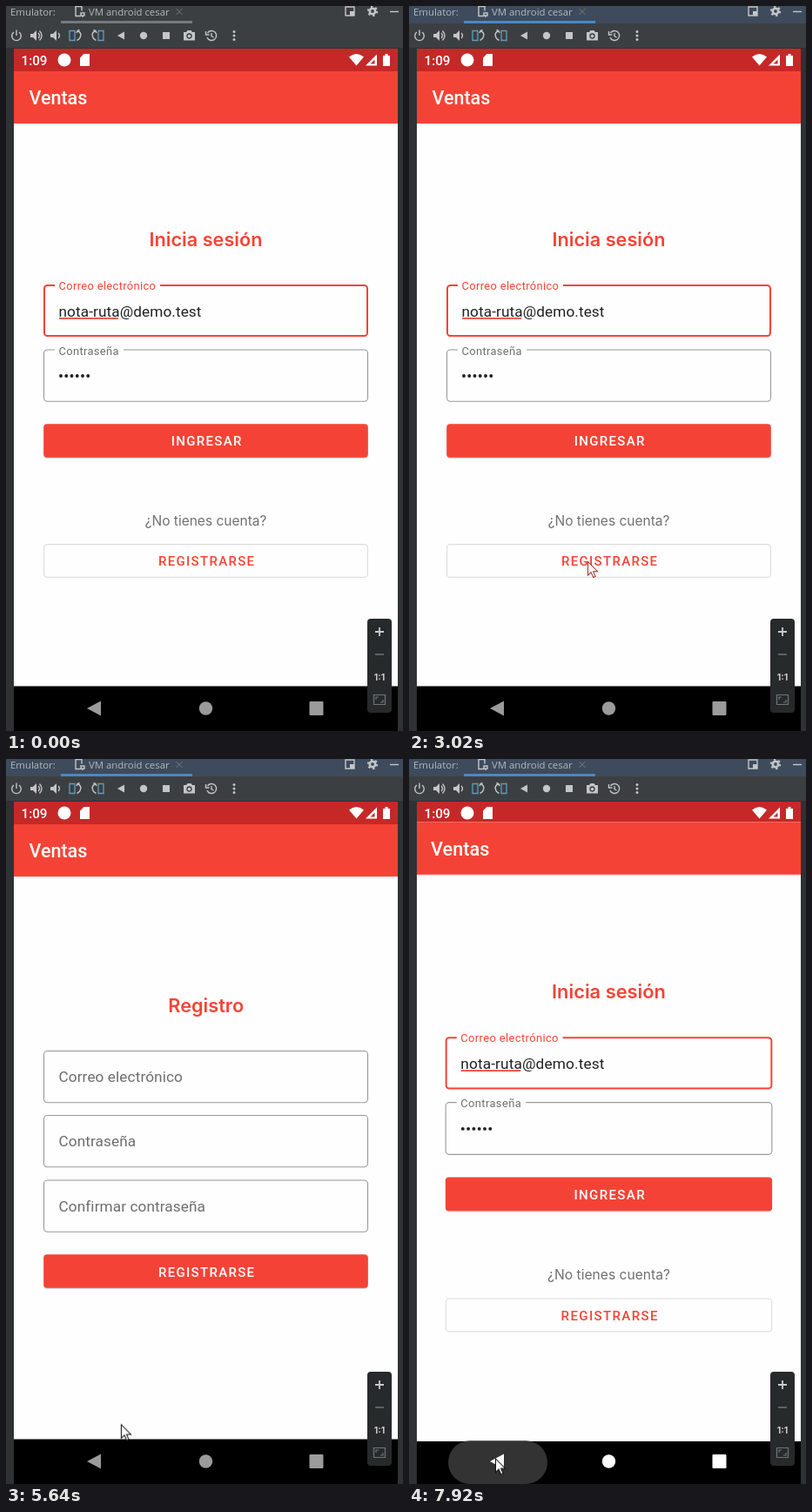
Write an HTML page that moves like this. It is 456 px wide and 833 px high and loops after 8000 ms.

```html
<!DOCTYPE html>
<html lang="es">
<head>
<meta charset="utf-8">
<title>Ventas</title>
<style>
  html, body { margin: 0; width: 100%; height: 100%; overflow: hidden; background: #2f3133; }
  svg { display: block; width: 100vw; height: 100vh; }
  text { font-family: Roboto, sans-serif; white-space: pre; }
  .ide { font: 11.4px "Open Sans", sans-serif; fill: #b4b8bb; }
  .bar { font-size: 21.5px; font-weight: 500; fill: #fff; }
  .head { font: 600 21.7px Inter, sans-serif; fill: #f44336; text-anchor: middle; }
  .ask { font: 15.5px Inter, sans-serif; fill: #707070; text-anchor: middle; }
  .in { font-size: 17.2px; letter-spacing: .1px; fill: #212121; }
  .hint { fill: #6c6c6c; }
  .label { font-size: 12.9px; letter-spacing: .35px; fill: #6f6f6f; }
  .btn { font-size: 15px; font-weight: 500; letter-spacing: 1.34px; text-anchor: middle; fill: #fff; }
  .red { fill: #f44336; }
  .box { fill: none; stroke: #989898; stroke-width: 1.1; }
  .focus { fill: none; stroke: #f44336; stroke-width: 2; }
  .ico { fill: #c3c6c8; }
  .line { fill: none; stroke: #c3c6c8; stroke-width: 1.4; }
  .blue { fill: none; stroke: #5f9cc0; stroke-width: 1.3; }

  /* every animation shares one 8 s loop: 1% = 80 ms */
  .loop { animation: 8s linear infinite; }
  .step { animation-timing-function: step-end; }
  #login, #signup { transform-origin: 229.5px 441px; }
  #title { animation-name: title; }
  #tab { animation-name: tab; }
  #caret { animation-name: caret; }
  #press { animation-name: press; }
  #login { animation-name: login; }
  #signup { animation-name: signup, fade; }
  #halo { animation-name: halo; }
  #nav { animation-name: nav; }
  #mouse-x { animation-name: mouse-x; }
  #mouse-y { animation-name: mouse-y; }
  #mouse { animation-name: mouse; }

  @keyframes title { 0% { fill: #3c3f41; } 26.875%, 100% { fill: #3d4b5c; } }
  @keyframes tab { 0% { fill: #747a80; } 26.875%, 100% { fill: #4a88c7; } }
  @keyframes caret {
    0%, 7.75%, 20.25%, 37%, 100% { opacity: 0; }
    1.5%, 14%, 26% { opacity: 1; }
  }
  @keyframes press {
    0%, 26.87% { cx: 205px; r: 14px; opacity: 0; }
    26.875% { cx: 205px; r: 14px; opacity: .12; animation-timing-function: ease-out; }
    34.5% { cx: 229px; r: 190px; opacity: .12; }
    37%, 100% { cx: 229px; r: 200px; opacity: 0; }
  }
  @keyframes login {
    0% { transform: scale(1); }
    47.5% { transform: scale(1); animation-timing-function: cubic-bezier(.22, 1, .36, 1); }
    53.125%, 97.2% { transform: scale(1.05); }
    97.21% { transform: scale(1.02); animation-timing-function: ease-out; }
    100% { transform: scale(1.0045); }
  }
  @keyframes signup {
    0% { transform: scale(.85); }
    47.5% { transform: scale(.85); animation-timing-function: cubic-bezier(.22, 1, .36, 1); }
    53.125%, 96.6% { transform: scale(1); }
    98.1%, 100% { transform: scale(.92); }
  }
  @keyframes fade {
    0%, 47.69% { opacity: 0; }
    49.125%, 96.6% { opacity: 1; }
    98.1%, 100% { opacity: 0; }
  }
  @keyframes halo {
    0%, 82.99% { x: 87px; y: 791px; width: 24px; height: 24px; rx: 12px; fill: #121212; opacity: 0; }
    83% { x: 87px; y: 791px; width: 24px; height: 24px; rx: 12px; fill: #121212; opacity: 1; }
    85.5% { x: 50px; y: 782px; width: 104px; height: 51px; rx: 25.5px; fill: #1c1c1c; }
    89%, 97.2% { x: 45px; y: 782px; width: 114px; height: 51px; rx: 25.5px; fill: #333; }
    100% { x: 45px; y: 784px; width: 114px; height: 49px; rx: 24.5px; fill: #333; opacity: 1; }
  }
  @keyframes nav { 0%, 85.5% { fill: #9b9b9b; } 89%, 100% { fill: #fff; } }
  @keyframes mouse-x {
    0%, 6.375% { transform: translateX(431px); }
    14.25% { transform: translateX(28px); }
    15.75% { transform: translateX(59px); }
    21% { transform: translateX(182px); animation-timing-function: ease-out; }
    26.125%, 60.25% { transform: translateX(205px); }
    70.5% { transform: translateX(132px); animation-timing-function: ease-out; }
    75.75% { transform: translateX(94px); }
    78%, 100% { transform: translateX(99px); }
  }
  @keyframes mouse-y {
    0%, 6.375% { transform: translateY(815px); }
    15.75% { transform: translateY(645px); }
    21% { transform: translateY(627px); animation-timing-function: ease-in-out; }
    26.125% { transform: translateY(638px); }
    60.25% { transform: translateY(638px); animation-timing-function: ease-out; }
    64.75% { transform: translateY(346px); animation-timing-function: ease-in; }
    70.5% { transform: translateY(764px); animation-timing-function: ease-out; }
    73.5% { transform: translateY(814px); }
    78%, 100% { transform: translateY(803.500px); }
  }
  @keyframes mouse {
    0% { stroke: #111; opacity: 0; }
    6.375% { stroke: #111; opacity: 1; }
    26.2% { stroke: #a8332c; opacity: 1; }
    61%, 100% { stroke: #111; opacity: 1; }
  }
</style>
</head>
<body>
<svg viewBox="0 0 456 833" preserveAspectRatio="none">
  <defs>
    <clipPath id="device"><rect x="9" y="49" width="441" height="784"/></clipPath>
    <clipPath id="outline"><rect x="43" y="618" width="373" height="39" rx="4"/></clipPath>
    <linearGradient id="fall" x2="0" y2="1">
      <stop stop-color="#000" stop-opacity=".1"/><stop offset="1" stop-color="#000" stop-opacity="0"/>
    </linearGradient>
    <g id="page">
      <rect x="9" y="49" width="441" height="784" fill="#fefefe"/>
      <rect x="9" y="135" width="441" height="3" fill="url(#fall)"/>
      <rect x="9" y="49" width="441" height="26" fill="#c62828"/>
      <rect x="9" y="75" width="441" height="60" fill="#f44336"/>
      <rect x="9" y="781.500" width="441" height="52"/>
      <text class="bar" x="26.500" y="113">Ventas</text>
    </g>
    <g id="solid">
      <rect x="43.300" y="2" width="372.400" height="38" rx="4" fill="#000" opacity=".16"/>
      <rect x="43.200" y=".3" width="372.600" height="38.500" rx="4" fill="#f44336"/>
    </g>
    <rect id="field" x="43.500" y=".5" width="372" height="59.300" rx="4"/>
  </defs>

  <!-- emulator window -->
  <rect width="456" height="833" fill="#2f3133"/>
  <rect y="20" width="456" height="28" fill="#3c3f41"/>
  <rect id="title" class="loop step" width="456" height="20"/>
  <rect id="tab" class="loop step" x="63" y="17" width="151" height="3"/>
  <text class="ide" x="5" y="11">Emulator:</text>
  <text class="ide" x="95" y="11">VM android cesar</text>
  <path class="line" d="M86 11.500h-6v-11h7v5M86 8h4v3h-4zM88 11v2"/>
  <path class="line" d="M195.500 3l7 7m0-7l-7 7" style="stroke:#74787b;stroke-width:1"/>
  <path class="line" d="M390 1h10v10h-10z"/><path class="ico" d="M395 6h5v5h-5z"/>
  <circle class="line" cx="421" cy="6" r="3.200" style="stroke-width:2.600"/>
  <circle class="line" cx="421" cy="6" r="5.200" style="stroke-width:2;stroke-dasharray:2.300 3.145"/>
  <path class="line" d="M441 6.500h10"/>
  <path class="line" d="M9 30a5.300 5.300 0 1 0 6 0M12 27.500v6.500"/>
  <path class="ico" d="M28 32h3l4-4v12l-4-4h-3z"/>
  <path class="line" d="M37 31q3 3 0 6M38.500 28.500q5 5.500 0 11"/>
  <path class="ico" d="M51 32h3l4-4v12l-4-4h-3z"/><path class="line" d="M60 31q3 3 0 6"/>
  <path class="blue" d="M73 28.500h6v11h-6z"/>
  <path class="line" d="M82 28.500q5 2 3.500 6.500q-.5 3-4 4.500M81 31l1-2.500l2.500-1"/>
  <path class="blue" d="M106 28.500h6v11h-6z"/>
  <path class="line" d="M103 28.500q-5 2-3.500 6.500q.5 3 4 4.500M104 31l-1-2.500l-2.500-1"/>
  <path class="ico" d="M128 34l8-4.500v9z"/>
  <circle class="ico" cx="158" cy="34" r="4.200"/>
  <path class="ico" d="M180 30h8v8h-8z"/>
  <path class="ico" d="M204 30h3l1.500-2h4l1.500 2h3v9.500h-13z"/>
  <circle cx="210.500" cy="34.500" r="2.500" fill="none" stroke="#3c3f41" stroke-width="1.300"/>
  <path class="line" d="M231 36a5.500 5.500 0 1 0 .5-5M229.500 29v4h4M236 31v3.500l2.500 1.500"/>
  <path d="M262 29.500v9.500" stroke="#c3c6c8" stroke-width="3" stroke-linecap="round" stroke-dasharray="0 4.500"/>

  <g clip-path="url(#device)">
    <g id="login" class="loop">
      <use href="#page"/>
      <text class="head" x="229.500" y="276">Inicia sesión</text>
      <rect class="focus" x="44" y="321" width="371" height="58" rx="3.500"/>
      <rect x="56" y="317" width="121" height="8" fill="#fefefe"/>
      <text class="label red" x="60.500" y="326">Correo electrónico</text>
      <text class="in" x="60.500" y="357">nota-ruta@demo.test</text>
      <path d="M61 358.800h68" stroke="#f44336" stroke-width="1.700"/>
      <rect id="caret" class="loop step" x="226" y="338" width="2" height="24" fill="#f44336"/>
      <use href="#field" class="box" y="394.500"/>
      <rect x="56" y="392" width="79" height="8" fill="#fefefe"/>
      <text class="label" x="60.500" y="400.500">Contraseña</text>
      <path d="M63 425h32" stroke="#212121" stroke-width="3.900" stroke-linecap="round" stroke-dasharray="0 6.250"/>
      <use href="#solid" y="480"/>
      <text class="btn" x="230.700" y="505.300">INGRESAR</text>
      <text class="ask" x="229.500" y="597">¿No tienes cuenta?</text>
      <g clip-path="url(#outline)"><circle id="press" class="loop" cy="638" fill="#f44336"/></g>
      <rect x="43.600" y="618.600" width="371.800" height="37.800" rx="4" fill="none" stroke="#dedede" stroke-width="1.200"/>
      <text class="btn red" x="230.700" y="643.300">REGISTRARSE</text>
    </g>
    <g id="signup" class="loop">
      <use href="#page"/>
      <text class="head" x="229.800" y="291">Registro</text>
      <use href="#field" class="box" y="335"/>
      <text class="in hint" x="60.500" y="371">Correo electrónico</text>
      <use href="#field" class="box" y="409"/>
      <text class="in hint" x="60.500" y="445">Contraseña</text>
      <use href="#field" class="box" y="483.500"/>
      <text class="in hint" x="60.500" y="519.500">Confirmar contraseña</text>
      <use href="#solid" y="569"/>
      <text class="btn" x="230.700" y="594.500">REGISTRARSE</text>
    </g>

    <!-- status bar -->
    <g fill="#fff">
      <text x="17.500" y="67.500" font-size="15.200" font-weight="500">1:09</text>
      <circle cx="67" cy="62" r="7.500"/>
      <path d="M89.500 55h6.500v14h-11v-9.500z"/>
      <path d="M394 58.500q8.500-7 17 0l-8.500 10z"/>
      <path d="M426 55.500v13h-13zM423.500 61.500v5h-5z" fill-rule="evenodd"/>
      <path d="M433 57h2.500v-2h3v2h2.500v12h-8z"/>
    </g>

    <!-- navigation bar -->
    <rect id="halo" class="loop"/>
    <g id="nav" class="loop">
      <path d="M93 807l16-8.500v17z"/>
      <circle cx="229.500" cy="807" r="7.700"/>
      <rect x="348.500" y="799" width="16" height="16" rx="1"/>
    </g>
  </g>

  <!-- zoom panel -->
  <rect x="415" y="704" width="28" height="108" rx="4" fill="#272a2b"/>
  <path d="M424 719h10M429 714v10" stroke="#c8cacc" stroke-width="1.800"/>
  <path d="M424 745h10" stroke="#66696b" stroke-width="1.800"/>
  <text x="429" y="775" style="font:700 10.500px Inter,sans-serif" text-anchor="middle" fill="#c8cacc">1:1</text>
  <path d="M422.500 791.500h13v11h-13zM425 797v-3h3M433 797v3h-3" fill="none" stroke="#717476" stroke-width="1.200"/>

  <g id="mouse-x" class="loop"><g id="mouse-y" class="loop">
    <path id="mouse" class="loop step" d="M.5.5v15.500l3.600-3.400l2.600 5.900l2.400-1.100l-2.500-5.700h5z" fill="#fff" stroke-width="1.050"/>
  </g></g>
</svg>
</body>
</html>
```
